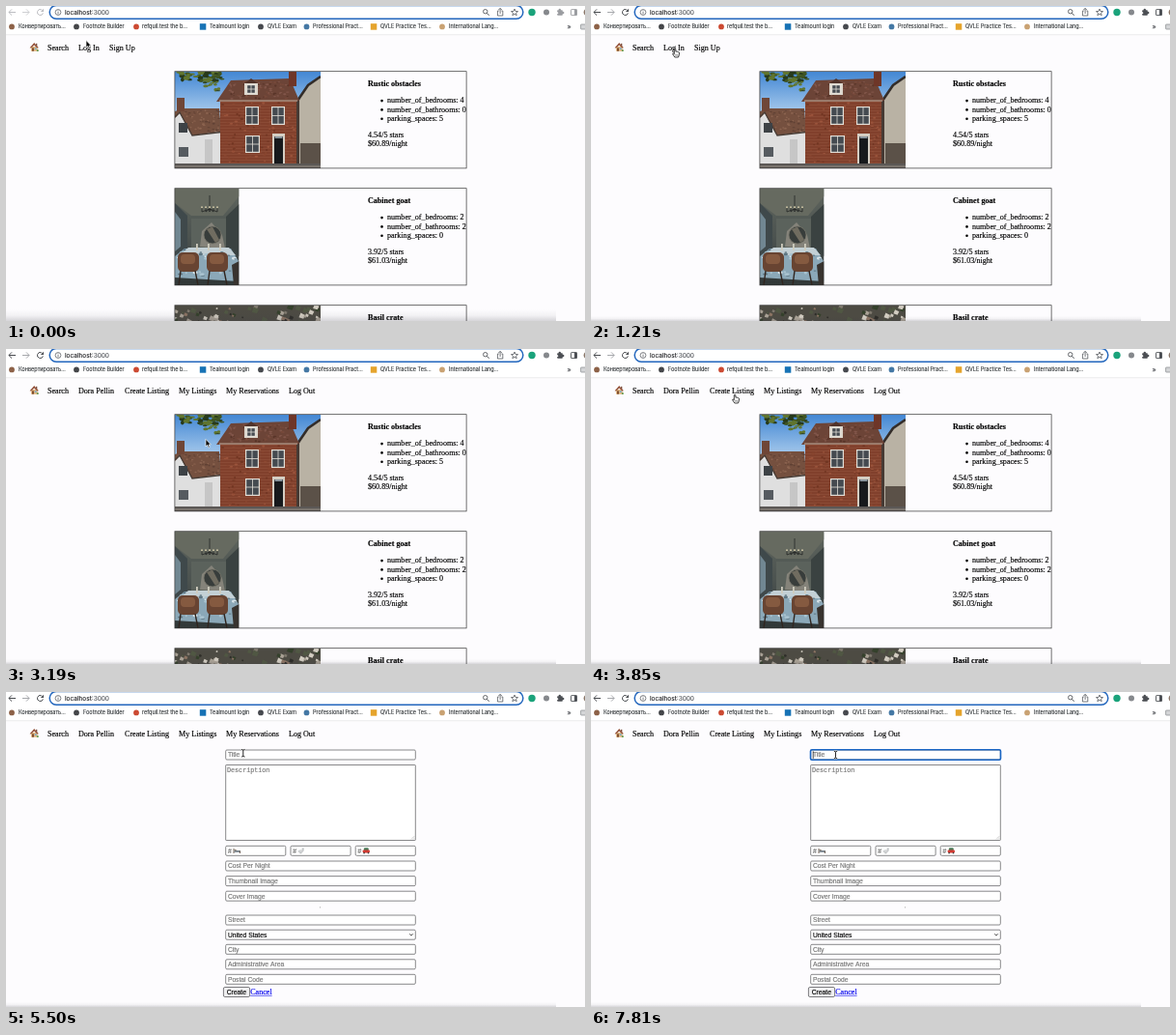
An HTML page with a canvas for the animation above (8000 ms loop, 600x326 px).

```html
<!DOCTYPE html>
<html lang="en">
<head>
<meta charset="utf-8">
<title>Rental listings demo</title>
<style>
html, body { margin: 0; width: 100%; height: 100%; overflow: hidden; background: #fdfcfe; }
canvas { display: block; width: 600px; height: 326px; }
</style>
</head>
<body>
<canvas id="stage"></canvas>
<script>
const W = 600, H = 326, LOOP = 8000, STEP = 110, LAST = 71;
const canvas = document.getElementById('stage');
const ratio = window.devicePixelRatio || 1;
canvas.width = W * ratio;
canvas.height = H * ratio;
const c = canvas.getContext('2d');

const SERIF = '8.08px "Liberation Serif", serif';
const BOLD = 'bold ' + SERIF;
const SANS = '6.73px "Liberation Sans", sans-serif';
const MONO = '6.73px "Liberation Mono", monospace';
const URL_FONT = '6.5px Inter, sans-serif';
const TAB_FONT = '5.5px Inter, sans-serif';

// Moments of the story, in ms
const ACTIVE = 330, OPEN_LOGIN = 1540, LOGGED_IN = 2970, OPEN_FORM = 4290, FOCUS = 5710;

// Pointer path: time, x, y
const path = [
  [0, 83, 35.5], [110, 83, 35.5], [660, 87, 44], [1760, 87, 44],
  [2420, 238.5, 118.5], [2970, 238.5, 118.5], [3520, 149, 47],
  [3850, 149, 47], [4180, 149.5, 41.5], [4950, 149.5, 41.5], [5610, 253.5, 65]
];

function box(x, y, w, h, fill) {
  c.fillStyle = fill;
  c.fillRect(x, y, w, h);
}
function poly(points, fill, stroke, width = 1) {
  c.beginPath();
  for (let i = 0; i < points.length; i += 2) c.lineTo(points[i], points[i + 1]);
  c.closePath();
  paint(fill, stroke, width);
}
function line(points, color, width = 1) {
  c.beginPath();
  for (let i = 0; i < points.length; i += 2) c.lineTo(points[i], points[i + 1]);
  paint(null, color, width);
}
function oval(x, y, rx, ry, fill, stroke, width = 1) {
  c.beginPath();
  c.ellipse(x, y, rx, ry, 0, 0, Math.PI * 2);
  paint(fill, stroke, width);
}
function dot(x, y, r, fill, stroke, width) {
  oval(x, y, r, r, fill, stroke, width);
}
function round(x, y, w, h, r, fill, stroke, width = 1) {
  c.beginPath();
  c.roundRect(x, y, w, h, r);
  paint(fill, stroke, width);
}
function paint(fill, stroke, width) {
  if (fill) { c.fillStyle = fill; c.fill(); }
  if (stroke) { c.strokeStyle = stroke; c.lineWidth = width; c.stroke(); }
}
// A hairline around the glyphs gives them the heavier smoothing of a desktop browser
function text(s, x, y, font = SERIF, fill = '#000') {
  c.font = font;
  c.fillStyle = c.strokeStyle = fill;
  c.lineWidth = 0.15;
  c.fillText(s, x, y);
  c.strokeText(s, x, y);
}
function link(s, x, y) {
  text(s, x, y, SERIF, '#0000ee');
  box(x, y + 0.9, c.measureText(s).width, 0.6, '#0000ee');
}
function clip(x, y, w, h, draw) {
  c.save();
  c.beginPath();
  c.rect(x, y, w, h);
  c.clip();
  c.translate(x, y);
  draw(w, h);
  c.restore();
}
function fade(x0, y0, x1, y1, ...colors) {
  const g = c.createLinearGradient(x0, y0, x1, y1);
  colors.forEach((color, i) => g.addColorStop(i / (colors.length - 1), color));
  return g;
}
function randomizer(seed) {
  return () => (seed = (seed * 16807) % 2147483647) / 2147483647;
}
function speckle(seed, count, x, y, w, h, size, tones) {
  const rnd = randomizer(seed);
  for (let i = 0; i < count; i++) {
    const tone = tones[Math.floor(rnd() * tones.length)];
    oval(x + rnd() * w, y + rnd() * h, size * (0.5 + rnd()), size * (0.3 + rnd() * 0.6), tone);
  }
}

function toolbar(active) {
  box(0, 0, W, 29.5, '#fff');
  box(0, 29.5, W, 0.7, '#e3e3e6');
  const dark = active ? '#4a4d51' : '#bdbec2';
  const pale = active ? '#a6a8ac' : '#cfd0d3';
  line([10, 6.5, 3, 6.5], dark);
  line([6, 3.4, 2.9, 6.5, 6, 9.6], dark);
  line([17, 6.5, 24, 6.5], pale);
  line([21, 3.4, 24.1, 6.5, 21, 9.6], pale);
  c.beginPath();
  c.arc(35.5, 6.5, 3, 0.3, 5.3);
  paint(null, dark, 1);
  poly([39, 2.8, 39, 6, 35.8, 6], dark);

  round(45.2, -0.6, 490.6, 13.8, 6.9, '#fff', '#2266bd', 1.5);
  dot(54, 6.5, 2.9, null, '#5f6368', 0.8);
  box(53.6, 6, 0.8, 2.3, '#5f6368');
  box(53.6, 4.6, 0.8, 0.8, '#5f6368');
  text('localhost', 61, 9, URL_FONT, '#202124');
  const width = c.measureText('localhost').width;
  text(':3000', 61 + width, 9, URL_FONT, '#55585d');

  const ink = '#55585d';
  dot(496.7, 5.7, 2.2, null, ink, 0.9);
  line([498.3, 7.3, 500.6, 9.8], ink, 1);
  line([510.8, 5, 509.4, 5, 509.4, 10, 514.8, 10, 514.8, 5, 513.4, 5], ink, 0.8);
  line([512.1, 8, 512.1, 2.5], ink, 0.8);
  line([510.4, 4, 512.1, 2.3, 513.8, 4], ink, 0.8);
  const star = [];
  for (let i = 0; i < 10; i++) {
    const a = i * Math.PI / 5 - Math.PI / 2, r = i % 2 ? 1.6 : 3.7;
    star.push(527 + r * Math.cos(a), 6.7 + r * Math.sin(a));
  }
  poly(star, null, ink, 0.8);

  const tool = active ? '#4b4e53' : '#9a9ca0';
  dot(545, 6.5, 3.7, '#1ba37b');
  dot(560, 6.5, 3, '#85888c');
  round(571.2, 4.2, 5.6, 5.6, 0.7, tool);
  dot(573.8, 3.9, 1.2, tool);
  dot(577.2, 7, 1.2, tool);
  dot(571.4, 7.2, 0.9, '#fff');
  round(585.5, 3.6, 6, 6, 0.6, null, tool, 0.9);
  box(589, 3.6, 2.5, 6, tool);
  dot(602, 6.5, 3.4, '#8a7668');

  const marks = [
    [6, 13, 'Конвертировать...', '#8d6248'], [73, 80, 'Footnote Builder', '#444649'],
    [135, 141, 'refquil.test the b...', '#cc4a32'], [204, 211, 'Tealmount login', '#1672b5'],
    [264, 271, 'QVLE Exam', '#46494e'], [311.5, 318, 'Professional Pract...', '#4478a4'],
    [381, 388, 'QVLE Practice Tes...', '#e5a42c'], [452, 459, 'International Lang...', '#c9a273']
  ];
  marks.forEach(([x, tx, label, color], i) => {
    if (i === 3 || i === 6) box(x - 3.2, 18.2, 6.5, 6.5, color);
    else dot(x, 21.4, 2.9, color);
    text(label, tx, 23.4, TAB_FONT, '#3c4043');
  });
  text('»', 581.5, 23.6, '7px Inter, sans-serif', '#4b4e53');
  round(595.6, 19, 7, 5, 0.6, '#d4d5d7', '#85888c', 0.7);
}

function homeIcon() {
  box(26, 42, 6.6, 4.8, '#dfb783');
  box(31, 38.8, 1.3, 3, '#7c5545');
  poly([24.6, 43.2, 29.2, 38, 33.9, 43.2, 32.4, 43.6, 29.2, 40.4, 26, 43.6], '#94523a');
  box(27, 43.4, 1.9, 3.3, '#7d4a2c');
  box(29.8, 43.3, 1.8, 1.6, '#75aed2');
  box(31.9, 45.2, 1.8, 1.7, '#5d9442');
}

const guestLinks = [[43, 'Search'], [75, 'Log In'], [107, 'Sign Up']];
const userLinks = [[43, 'Search'], [75, 'Dora Pellin'], [123, 'Create Listing'],
  [179, 'My Listings'], [228, 'My Reservations'], [293, 'Log Out']];

function nav(links) {
  homeIcon();
  for (const [x, label] of links) text(label, x, 45.8);
}

function sash(x, y, w, h) {
  box(x, y, w, h, '#e2ded6');
  box(x + 1.2, y + 1.2, w - 2.4, h - 2.4, '#454a50');
  box(x + w / 2 - 0.4, y, 0.8, h, '#e2ded6');
  box(x, y + h / 2 - 0.4, w, 0.8, '#e2ded6');
}

function brickHouse(w, h) {
  box(0, 0, w, h, fade(0, 0, 0, 50, '#4387d4', '#b9d6f0'));
  // white cottage
  poly([0, 41, 9, 38, 46, 38, 48, 62, 17, 66, 5, 43, 0, 50], '#75503f');
  speckle(9, 60, 10, 40, 36, 22, 1.1, ['#8c6450', '#5f4034']);
  box(2, 27, 8, 14, '#6f4637');
  poly([0, 48, 5, 43, 18, 66, 48, 62, 48, 97, 0, 97], '#dfdfdf');
  line([0, 47, 5, 42, 18, 66, 48, 62.5], '#463a33', 1.3);
  box(4, 53, 9, 10, '#3d4246');
  box(4, 78, 10, 10, '#565b60');
  box(31, 70, 8, 26, '#c6c6c6');
  // right neighbour
  poly([125, 31, 139, 12, 151, 5, 151, 97, 125, 97], '#b9b2a4');
  line([125, 33, 138, 14, 151, 5], '#332d2a', 2.6);
  box(125, 30, 4, 66, '#463a34');
  box(130, 74, 21, 23, '#5b5148');
  // main front
  box(47, 27, 79, 69, '#81402c');
  for (let y = 31; y < 95; y += 3) box(47, y, 79, 0.6, '#92503b');
  speckle(52, 170, 49, 32, 75, 62, 1.3, ['#9a533b', '#703522', '#894630']);
  poly([43, 31, 58, 9, 119, 7, 129, 30], '#6c4437');
  speckle(21, 90, 57, 10, 61, 18, 1.3, ['#81564a', '#593529', '#76493a']);
  box(118, 0, 8, 15, '#6e3628');
  poly([70, 14, 79, 7, 88, 14], '#50332a');
  box(72, 12, 14, 12, '#dcd6cc');
  sash(74, 13, 10, 10);
  box(46, 29.3, 81, 1.5, '#a88d7e');
  sash(73, 36, 14, 19);
  sash(100, 36, 14, 19);
  sash(73, 66, 15, 18);
  box(101, 64, 13, 32, '#d5cec3');
  box(103, 67, 9, 29, '#17191c');
  box(103.5, 67, 8, 2, '#8a949c');
  // foliage and street
  speckle(31, 50, 4, 0, 46, 10, 2.6, ['#273a1b', '#3f5423', '#60752f']);
  speckle(36, 16, 28, 8, 20, 12, 1.8, ['#31441e', '#60752f']);
  box(0, 95, w, 5, '#5c5856');
  box(0, 97.5, w, 1, '#938b82');
}

function diningRoom(w, h) {
  box(0, 0, w, h, fade(0, 0, 0, h, '#5f655e', '#4c5350', '#303737'));
  poly([0, 0, w, 0, w, 8, 50, 28, 17, 28, 0, 15], '#666a60');
  poly([0, 15, 13, 28, 13, 66, 0, 74], '#3f494b');
  poly([0, 24, 6, 32, 6, 60, 0, 65], '#718792');
  box(17, 31, 36, 33, '#5b625c');
  poly([26, 60, 28, 44, 38, 35, 49, 48, 52, 62], '#85837a');
  dot(39, 48, 9, '#383d3b', '#77756a', 0.8);
  poly([33, 42, 39, 39.5, 46, 53, 42, 56], '#706c60');
  poly([53, 29, w, 16, w, 70, 53, 64], '#3a4241');
  line([36, 7, 36, 18], '#252826', 0.8);
  for (const x of [-8, -4, 0, 4, 8]) {
    line([36, 21, 36 + x, 24, 36 + x, 20], '#252826', 0.8);
    dot(36 + x, 19.3, 1, '#c9c1a3');
  }
  poly([10, 62, 58, 62, w, 76, w, 96, 0, 92, 0, 70], '#8ba8b8');
  poly([14, 61, 56, 61, 63, 69, 4, 69], '#c3d0d5');
  speckle(15, 34, 3, 62, 60, 30, 1.8, ['#d9e4e9', '#5d7683', '#a9c3d0']);
  for (const x of [22, 34, 46]) box(x, 57, 1.8, 7, '#cfccbe');
  for (const x of [3, 33]) {
    round(x, 66, 22, 20, 5, '#684432');
    round(x + 3, 68, 15, 10, 4, '#855a40');
    line([x + 3, 85, x + 1, 100], '#30251f', 1.4);
    line([x + 18, 85, x + 21, 100], '#30251f', 1.4);
  }
  poly([59, 79, w, 75, w, h, 61, h], '#38332f');
}

function cobbles(w, h) {
  box(0, 0, w, h, '#4d4b43');
  const rnd = randomizer(77);
  const tones = ['#aaa296', '#7f796e', '#d2ccc1', '#505743', '#2d2c28', '#8c7463', '#34402b'];
  for (let i = 0; i < 300; i++) {
    const x = rnd() * w, y = rnd() * h, s = 1.5 + rnd() * 4;
    poly([x, y - s / 2, x + s, y, x + s * 0.6, y + s * 0.8, x - s * 0.4, y + s / 2],
      tones[Math.floor(rnd() * tones.length)]);
  }
}

function card(y, title, counts, stars, price, imageWidth, image) {
  clip(175, y, imageWidth, 100, image);
  c.strokeStyle = '#333';
  c.lineWidth = 0.7;
  c.strokeRect(174.9, y - 0.3, 302.2, 100.2);
  text(title, 375, y + 15, BOLD);
  ['bedrooms', 'bathrooms', 'parking'].forEach((name, i) => {
    const base = y + 32.3 + i * 9.3;
    const label = i < 2 ? 'number_of_' + name : name + '_spaces';
    dot(389.5, base - 2.2, 1.3, '#000');
    text(label + ': ' + counts[i], 395, base);
  });
  text(stars + '/5 stars', 375, y + 67.6);
  text('$' + price + '/night', 375, y + 77);
}

function listings() {
  card(68, 'Rustic obstacles', [4, 0, 5], '4.54', '60.89', 151, brickHouse);
  card(189, 'Cabinet goat', [2, 2, 0], '3.92', '61.03', 66.5, diningRoom);
  card(310, 'Basil crate', [3, 1, 2], '4.10', '58.20', 151, cobbles);
}

function field(x, y, w, label, color = '#757575', fill = '#fff') {
  round(x, y, w, 10, 1.2, fill, '#7b7b7d', 0.9);
  text(label, x + 2.2, y + 7.4, SANS, color);
}
function button(x, y, w, label, fill) {
  round(x, y, w, 10, 1.5, fill, '#6f6f72', 0.9);
  text(label, x + 3.3, y + 7.5, SANS);
}

function loginPage(hover) {
  text('Login', 225, 72.6);
  field(227.7, 85.2, 196.6, 'normanvole@inbox.test', '#000', '#e4eefc');
  field(227.7, 100.8, 196.6, '••••••••', '#000');
  button(225.4, 114, 24, 'Login', hover ? '#dddde0' : '#efeff0');
  link('Cancel', 249.7, 121.2);
}

function fieldIcons() {
  // bed
  box(235.6, 162, 0.9, 5, '#5d4a3d');
  box(236.5, 164, 6.3, 1.8, '#76818a');
  box(236.7, 163, 2, 1.2, '#8f8274');
  box(241.9, 164.5, 0.9, 2.5, '#5d4a3d');
  // toilet
  box(306.7, 161.3, 2, 3.3, '#c5c8ca');
  oval(305.3, 164.9, 2.4, 1.2, '#d9dbdc', '#b4b7b9', 0.5);
  box(304.4, 165.8, 2, 1.5, '#bfc2c4');
  // car
  round(370.9, 161.2, 4.8, 3, 1, '#4b7a58');
  round(369.7, 163.4, 7.2, 3, 0.8, '#cf3a32');
  box(370.4, 166, 1.4, 1.3, '#333');
  box(374.8, 166, 1.4, 1.3, '#333');
}

function formPage(t) {
  const x = 227.7, w = 196.6;
  field(x, 60, w, 'Title');
  if (t >= FOCUS) {
    round(x - 0.2, 59.8, w + 0.4, 10.4, 1.5, null, '#1b66c4', 1.6);
    if (Math.floor((t - FOCUS) / 500) % 2 === 0) box(229.8, 61.3, 0.7, 7.6, '#000');
  }
  round(x, 75.5, w, 78, 0.5, '#fff', '#7b7b7d', 0.9);
  text('Description', 229, 83, MONO, '#757575');
  line([420, 152.4, 423.2, 149.2], '#999', 0.5);
  line([422, 152.4, 423.2, 151.2], '#999', 0.5);
  for (const left of [x, 295, 362.2]) field(left, 159.3, 62.1, '#');
  fieldIcons();
  field(x, 175, w, 'Cost Per Night');
  field(x, 190.6, w, 'Thumbnail Image');
  field(x, 206.2, w, 'Cover Image');
  box(325.2, 222.5, 0.8, 0.8, '#777');
  field(x, 231, w, 'Street');
  field(x, 246.2, w, 'United States', '#000');
  line([418.2, 250.3, 420, 252.1, 421.8, 250.3], '#222', 0.8);
  field(x, 261.3, w, 'City');
  field(x, 276.8, w, 'Administrative Area');
  field(x, 292.3, w, 'Postal Code');
  button(225.4, 305.5, 27.2, 'Create', '#efeff0');
  link('Cancel', 253.2, 313);
}

function bottomShade(active) {
  const height = active ? 5 : 12;
  box(0, H - height, 570, height,
    fade(0, H - height, 0, H, 'rgba(60,60,70,0)', 'rgba(60,60,70,0.05)', 'rgba(60,60,70,0.2)'));
}

function pointerAt(t) {
  let i = 0;
  while (i < path.length - 2 && t >= path[i + 1][0]) i++;
  const [t0, x0, y0] = path[i], [t1, x1, y1] = path[i + 1];
  const u = Math.min(1, (t - t0) / (t1 - t0));
  const k = u * u * (3 - 2 * u);
  return [x0 + (x1 - x0) * k, y0 + (y1 - y0) * k];
}

function inside(x, y, l, top, r, b) {
  return x >= l && x <= r && y >= top && y <= b;
}
function pointerKind(x, y, page, links) {
  c.font = SERIF;
  const overLink = links.some(([lx, s]) =>
    inside(x, y, lx, 38, lx + c.measureText(s).width, 48.5));
  if (overLink) return 'hand';
  const overField = page === 'login'
    ? inside(x, y, 227, 85, 425, 95.5) || inside(x, y, 227, 100.5, 425, 111)
    : page === 'form' && inside(x, y, 227, 59.5, 425, 70.5);
  return overField ? 'beam' : 'arrow';
}

function pointer(x, y, kind) {
  c.save();
  c.translate(x, y);
  c.lineJoin = 'round';
  if (kind === 'arrow') {
    poly([0, 0, 0, 7.6, 1.7, 6, 2.9, 8.8, 4.2, 8.2, 3, 5.6, 5.3, 5.6], '#000', '#fff', 0.7);
  } else if (kind === 'hand') {
    poly([-0.7, 0.6, 0, 0, 0.8, 0.6, 0.9, 3.1, 2.2, 3.1, 3.4, 3.5, 4.4, 4.1, 4.4, 6.4,
      3.5, 9, -0.2, 9, -2.4, 5.7, -1.9, 4.9, -0.7, 5.8], '#fff', '#111', 0.8);
    for (const dx of [0.7, 1.8, 2.9]) line([dx, 5.9, dx, 7.7], '#222', 0.4);
  } else {
    const beam = () => {
      c.beginPath();
      c.moveTo(-1.7, -3.8);
      c.quadraticCurveTo(0, -3.8, 0, -2.6);
      c.lineTo(0, 2.6);
      c.quadraticCurveTo(0, 3.8, -1.7, 3.8);
      c.moveTo(1.7, -3.8);
      c.quadraticCurveTo(0, -3.8, 0, -2.6);
      c.moveTo(0, 2.6);
      c.quadraticCurveTo(0, 3.8, 1.7, 3.8);
    };
    beam();
    paint(null, '#fff', 1.8);
    beam();
    paint(null, '#111', 0.9);
  }
  c.restore();
}

function pageAt(t) {
  if (t >= OPEN_FORM) return 'form';
  return t >= OPEN_LOGIN && t < LOGGED_IN ? 'login' : 'home';
}

function render(t) {
  c.setTransform(ratio, 0, 0, ratio, 0, 0);
  box(0, 0, W, H, '#fdfcfe');
  const active = t >= ACTIVE;
  toolbar(active);
  const page = pageAt(t);
  const links = t >= LOGGED_IN ? userLinks : guestLinks;
  const [x, y] = pointerAt(t);
  nav(links);
  if (page === 'home') listings();
  else if (page === 'login') loginPage(inside(x, y, 225, 114, 249, 124));
  else formPage(t);
  bottomShade(active);
  pointer(x, y, pointerKind(x, y, page, links));
}

function tick() {
  const t = performance.now() % LOOP;
  render(Math.min(Math.floor(t / STEP), LAST) * STEP);
  requestAnimationFrame(tick);
}
tick();
</script>
</body>
</html>
```
